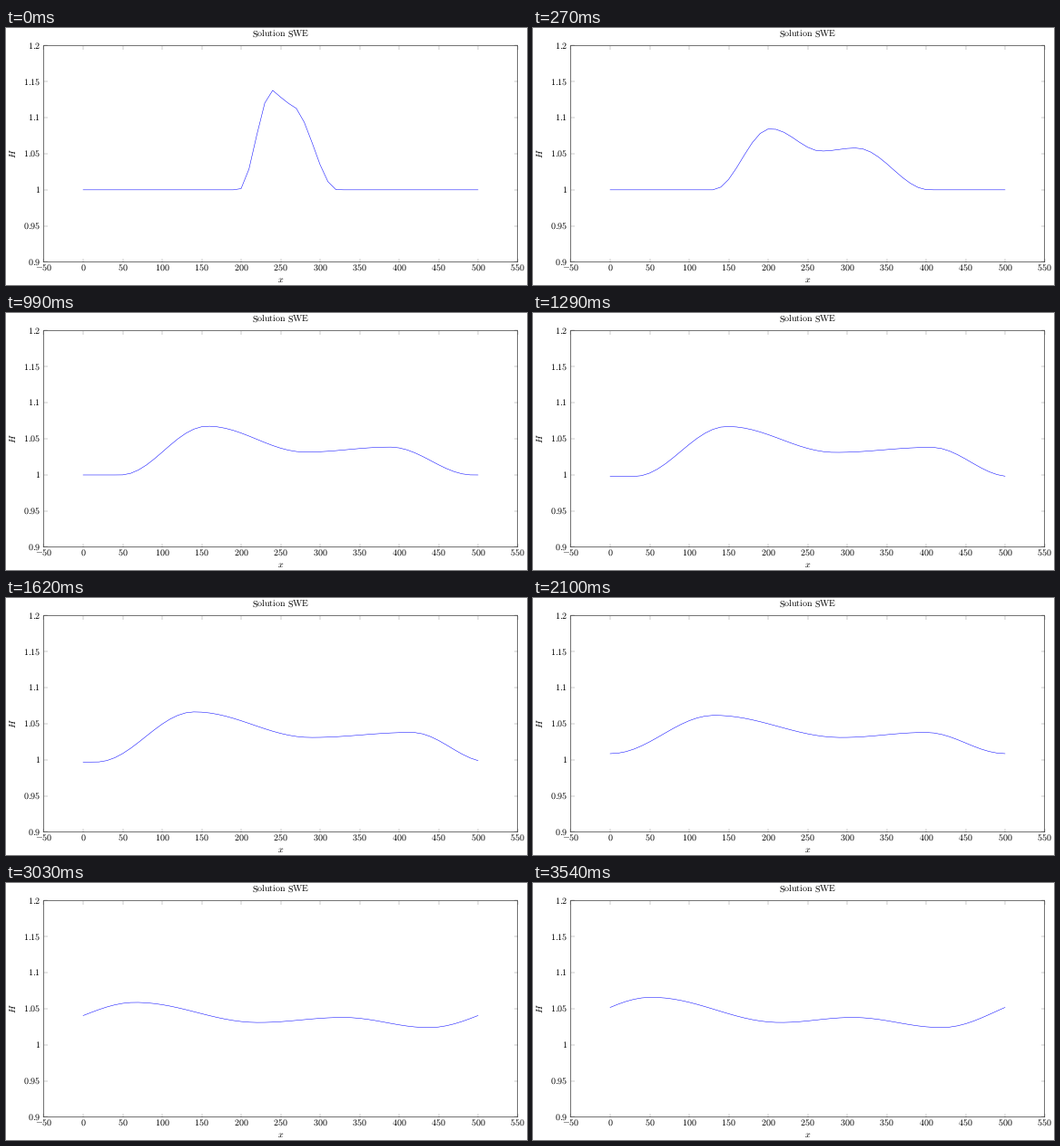
A matplotlib script for the animation above (3.57 s loop, 574 px wide and 284 px high).

```python
import numpy as np
import matplotlib.pyplot as plt
from matplotlib.animation import FuncAnimation

W, H, DPI = 574, 284, 72
FRAMES, STEP = 119, 30
LEFT, RIGHT, TOP, BOTTOM = 41.5, 563.5, 19.5, 258.5
XLIM, YLIM = (-50, 550), (0.9, 1.2)
LENGTH = 500

plt.rcParams["mathtext.fontset"] = "cm"
plt.rcParams["text.hinting"] = "none"

grid = np.arange(0, LENGTH + 1, 10)


def step(t, mid, width):
    """Smooth switch from 0 to 1 around time mid."""
    return 1 / (1 + np.exp((mid - t) / width))


def ease(x, start, end):
    """Half cosine wave from 0 at start to 1 at end."""
    u = np.clip((x - start) / (end - start), 0, 1)
    return (1 - np.cos(np.pi * u)) / 2


def wave_points(t):
    """Turning points (x, elevation in 1/1000) of the surface."""
    spread = np.exp(-t / 17)
    fade = np.exp(-t / 6.5)
    surge = step(t, 93, 4)

    # The two fronts run apart until they meet across the periodic border.
    left = 51 + 146 * spread - 0.75 * t - 43 * surge
    right = min(522 - 200 * spread, left + LENGTH)
    base = 28 * step(t, 71, 5) - 4 * step(t, 42, 3)

    crest = 159 + 81 * spread - 0.4 * t - 60 * surge
    crest_h = 67 + 71 * fade - 13 * np.exp(-((t - 88) / 19) ** 2)

    trough = 276 - 18 * spread + 0.25 * t - 90 * surge
    trough_h = 31 + 91 * fade

    shoulder = min(452 - 190 * np.exp(-t / 30), 470 - t - 45 * surge)
    shoulder_h = 38 + 80 * fade

    return [(left, base), (crest, crest_h), (trough, trough_h),
            (shoulder, shoulder_h), (right, base),
            (left + LENGTH + 1e-6, base), (crest + LENGTH, crest_h)]


def surface(t):
    points = wave_points(t)
    h = np.full(grid.shape, points[0][1])
    for (x0, h0), (x1, h1) in zip(points, points[1:]):
        h += (h1 - h0) * ease(grid, x0, x1)
    return 1 + h / 1000


fig = plt.figure(figsize=(W / DPI, H / DPI), dpi=DPI, facecolor="white")
ax = fig.add_axes([LEFT / W, 1 - BOTTOM / H,
                   (RIGHT - LEFT) / W, (BOTTOM - TOP) / H])
ax.set(xlim=XLIM, ylim=YLIM)
xticks = np.arange(-50, 551, 50)
yticks = np.arange(18, 25) / 20
ax.set_xticks(xticks)
ax.set_yticks(yticks)
ax.tick_params(direction="in", length=4.25, width=0.4, color="gray",
               top=True, right=True, labelbottom=False, labelleft=False)
for spine in ax.spines.values():
    spine.set_linewidth(0.55)
    spine.set_snap(False)


def label(x, y, text, ha="center", va="baseline", **kw):
    fig.text(x / W, 1 - y / H, f"${text}$", fontsize=10, ha=ha, va=va, **kw)


for v in xticks:
    px = LEFT + (v - XLIM[0]) / (XLIM[1] - XLIM[0]) * (RIGHT - LEFT)
    label(px, 268, f"{v}")
for v in yticks:
    py = BOTTOM - (v - YLIM[0]) / (YLIM[1] - YLIM[0]) * (BOTTOM - TOP)
    label(38.2, py + 3.2, f"{v:g}", ha="right")
label(302.8, 10, r"\mathrm{Solution\ SWE}")
label(302.8, 281, "x")
label(7.5, 138.5, "H", va="center", rotation=90)

line, = ax.plot(grid, surface(0), color="blue", linewidth=0.5)


def update(frame):
    line.set_ydata(surface(frame))
    return line,


anim = FuncAnimation(fig, update, frames=FRAMES, interval=STEP,
                     repeat=True, repeat_delay=0, blit=False)
plt.show()
```
